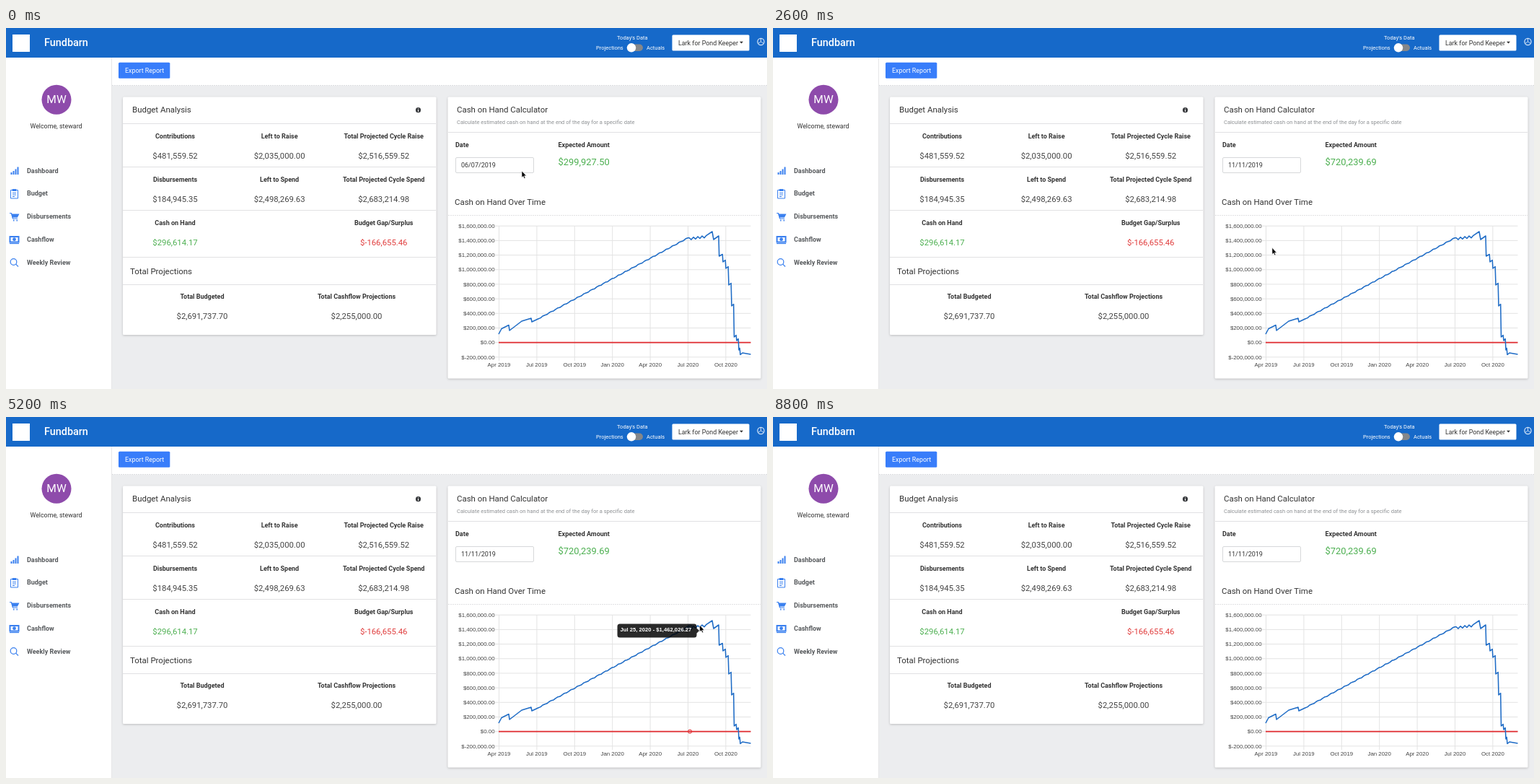
Write an HTML page that moves like this. It is 1055 px wide and 500 px high and loops after 8900 ms.

```html
<!DOCTYPE html>
<html lang="en">
<head>
<meta charset="utf-8">
<title>Campaign dashboard</title>
<style>
  html, body { margin: 0; width: 100%; height: 100%; overflow: hidden; background: #ecedef; }
  svg { display: block; width: 1055px; height: 500px; font-family: Roboto, sans-serif; }
  text { fill: #333; white-space: pre; }
  .mid { text-anchor: middle; }
  .head { font-size: 11.45px; }
  .label { font-size: 9px; font-weight: 700; }
  .value { font-size: 11.3px; fill: #444; }
  .nav { font-size: 9px; font-weight: 700; fill: #56595c; }
  .bar { font-size: 7.5px; }
  .white { fill: #fff; }
  .green { fill: #4caf50; }
  .red { fill: #e03c3c; }
  .rule { stroke: #e1e1e3; }
  .card { fill: #fff; filter: drop-shadow(0 1px 1.5px rgba(0, 0, 0, .2)); }
  .icon { fill: none; stroke: #3a80ef; stroke-width: 1.2; }
  #axes text, #calendar text, #tip text { font-family: "Liberation Sans", Arial, sans-serif; }
  #axes text { font-size: 7.85px; fill: #444; }
  #axes path { stroke: #e3e3e3; }
  #calendar text { font-size: 8.2px; fill: #000; text-anchor: middle; }
  #calendar .title { font-size: 9.75px; font-weight: 700; }
  #calendar .chosen { fill: #fff; }
  #tip text { font-size: 7.67px; font-weight: 700; fill: #fff; }
</style>
</head>
<body>
<svg viewBox="0 0 1055 500">
  <rect width="1055" height="500" fill="#ecedef"/>
  <path d="M0 41H147V500H0ZM147 41H1055V80H147Z" fill="#fff"/>
  <path d="M146.5 41V500" stroke="#e6e6e8"/>
  <path d="M147 79.5H1055" stroke="#dcdde0" stroke-dasharray="2 1"/>

  <!-- top bar -->
  <rect width="1055" height="41" fill="#1669c9"/>
  <rect x="9" y="9" width="24" height="24" fill="#fff"/>
  <text class="white" x="53" y="25" font-size="14.4" font-weight="500">Fundbarn</text>
  <text class="bar white" x="847" y="16">Today's Data</text>
  <text class="bar white" x="818" y="29.5">Projections</text>
  <text class="bar white" x="888" y="29.5">Actuals</text>
  <rect x="862" y="22.5" width="21" height="9.5" rx="4.7" fill="#85878a"/>
  <circle cx="867" cy="27.3" r="6.2" fill="#fff"/>
  <rect x="923.5" y="9.5" width="107" height="22" rx="1.5" fill="#fff"/>
  <text x="932" y="23.5" font-size="8.9">Lark for Pond Keeper</text>
  <path d="M1017 18.8h5l-2.5 2.7Z" fill="#333"/>
  <g fill="none" stroke="#d7e6f8">
    <circle cx="1046.5" cy="19" r="4.6" stroke-width="1.2"/>
    <path d="M1046.5 19v-4.5m0 4.500l-4 2.500m4 -2.500l4 2.500" stroke-width=".9"/>
  </g>

  <!-- sidebar -->
  <circle cx="70" cy="99.3" r="20.5" fill="#8e4bab"/>
  <text class="mid white" x="70" y="104.3" font-size="15.5">MW</text>
  <text class="mid" x="69.5" y="139" font-size="8.85">Welcome, steward</text>
  <g class="icon">
    <path d="M7.5 203v-3m3 3v-5m3 5v-7.500m3 7.500v-10.500" stroke-width="2"/>
    <path d="M6.5 224.500h10v11.500h-10ZM9 223.500h5v2h-5ZM9 228.500h5M9 231h5M9 233.500h3" stroke-width="1"/>
    <path d="M5 256.500h2.500l2 7.500h6.500"/>
    <path d="M8 258h9.500l-2 4h-6.500Z" fill="#3a80ef"/>
    <path d="M10 266.500h1.500m3 0h1.500" stroke-width="2"/>
    <path d="M5.500 289h12v7.500h-12Z" stroke-width="2"/>
    <circle cx="11.5" cy="292.700" r="1.800" fill="#3a80ef"/>
    <path d="M5 298.500h13"/>
    <circle cx="10.5" cy="324" r="4.300"/>
    <path d="M13.700 327.200l3.300 3.300"/>
  </g>

  <rect x="156" y="47.8" width="71.3" height="22" rx="1.5" fill="#387dfa"/>
  <text class="white" x="165" y="62" font-size="8.9">Export Report</text>

  <!-- cards -->
  <rect class="card" x="162" y="95.5" width="434.5" height="329.5" rx="1.5"/>
  <rect class="card" x="612.5" y="95.5" width="434" height="390" rx="1.5"/>
  <path class="rule" d="M162 132.5h434m-434 60h434m-434 60h434m-434 65h434m-434 38h434M613 144.5h433"/>
  <path class="rule" d="M613 259.5h433" stroke-dasharray="2 1"/>
  <circle cx="571.5" cy="113.7" r="3.6" fill="#3b3d40"/>
  <path d="M571.5 113v3m0 -4.700v.9" stroke="#fff"/>
  <text class="head" x="175" y="117">Budget Analysis</text>
  <text class="head" x="172" y="340.5">Total Projections</text>
  <text class="head" x="625" y="117">Cash on Hand Calculator</text>
  <text class="head" x="622" y="245">Cash on Hand Over Time</text>
  <text x="625" y="133" font-size="7.57" style="fill:#8d9093">Calculate estimated cash on hand at the end of the day for a specific date</text>
  <text class="label" x="623" y="164.800">Date</text>
  <text class="label" x="765.5" y="164.800">Expected Amount</text>
  <g id="labels"></g>

  <text id="amount" class="green" x="765.5" y="189.700" font-size="12.9"></text>
  <rect id="field" x="623.5" y="179.5" width="108" height="21" rx="1.5" fill="#fff"/>
  <text id="date" x="631" y="193" font-size="9"></text>
  <path id="caret" d="M679.5 185v10" stroke="#222" stroke-width=".8"/>

  <!-- chart -->
  <g id="axes"></g>
  <path d="M683 435.6H1032.5" stroke="#e02a2f" stroke-width="1.6"/>
  <path id="curve" fill="none" stroke="#1f6cc6" stroke-width="1.55" stroke-linejoin="round"/>
  <g id="dots" stroke-width=".9">
    <circle id="blueDot" r="3.5" fill="#2671c833" stroke="#2671c8"/>
    <circle id="redDot" cy="435.6" r="2.6" fill="#e02a2f33" stroke="#e02a2f"/>
  </g>
  <g id="tip">
    <path d="M3.500 0h103a3.500 3.500 0 0 1 3.500 3.500v12a3.500 3.500 0 0 1 -3.500 3.500h-103a3.500 3.500 0 0 1 -3.500 -3.500v-12a3.500 3.500 0 0 1 3.500 -3.500M110 6l3.500 3.500l-3.500 3.500Z" fill="#000" fill-opacity=".84"/>
    <text x="4" y="10.2"></text>
  </g>
  <g id="calendar"></g>
  <path id="cursor" d="M0 0V9.2L2.1 7.3 3.5 10.5 5 9.8 3.6 6.8H6.4Z" stroke="#fff" stroke-width=".6"/>
</svg>
<script>
const $ = id => document.getElementById(id);
const LOOP = 8900, STEP = 100, DAY = 864e5;
const OPEN = 500, PICK = 2300;

const clamp = (v, lo, hi) => Math.min(hi, Math.max(lo, v));
const show = (id, on) => { $(id).style.display = on ? '' : 'none'; };
const text = (x, y, str, cls = '') => `<text class="${cls}" x="${x}" y="${y}">${str}</text>`;
const money = v => '$' + v.toLocaleString('en-US', { minimumFractionDigits: 2, maximumFractionDigits: 2 });
const dateText = (date, options) => date.toLocaleString('en-US', { timeZone: 'UTC', year: 'numeric', ...options });

// Linear interpolation through rows of [key, value, value, ...]
function track(rows, key) {
  const i = rows.findIndex(r => r[0] >= key);
  if (i < 0) return rows[rows.length - 1].slice(1);
  if (i === 0) return rows[0].slice(1);
  const a = rows[i - 1], b = rows[i], k = (key - a[0]) / (b[0] - a[0]);
  return a.slice(1).map((v, j) => v + (b[j + 1] - v) * k);
}

function drawLabels() {
  const budget = [
    ['Contributions', 481559.52, 'Left to Raise', 2035000, 'Total Projected Cycle Raise', 2516559.52],
    ['Disbursements', 184945.35, 'Left to Spend', 2498269.63, 'Total Projected Cycle Spend', 2683214.98],
    ['Cash on Hand', 296614.17, , , 'Budget Gap/Surplus', -166655.46]
  ];
  const pair = (x, y, label, amount, tone = '') =>
    text(x, y, label, 'label mid') + text(x, y + 28.1, money(amount), 'value mid ' + tone);
  let out = pair(272, 375.2, 'Total Budgeted', 2691737.7) + pair(486, 375.2, 'Total Cashflow Projections', 2255000);
  budget.forEach((row, r) => {
    for (let c = 0; c < 3; c++) {
      const [label, amount] = row.slice(c * 2);
      const tone = r < 2 ? '' : c ? 'red' : 'green';
      if (label) out += pair(234.5 + c * 144.6, 152.7 + r * 59.9, label, amount, tone);
    }
  });
  ['Dashboard', 'Budget', 'Disbursements', 'Cashflow', 'Weekly Review'].forEach((name, i) => {
    out += text(29, 200.5 + i * 31.83, name, 'nav');
  });
  $('labels').innerHTML = out;
}

function drawAxes() {
  let out = '';
  for (let i = 0; i < 10; i++) {
    const y = 274.2 + i * 20.18;
    out += `<path d="M678 ${y}H1032.5"/><text x="677.5" y="${y + 2.7}" text-anchor="end">${money(1.6e6 - i * 2e5)}</text>`;
  }
  for (let i = 0; i < 7; i++) {
    const x = 683.5 + i * 52.4;
    const month = new Date(Date.UTC(2019, 3 + i * 3));
    out += `<path d="M${x} 274V461"/>` + text(x, 469, dateText(month, { month: 'short' }), 'mid');
  }
  $('axes').innerHTML = out;
}

// Balance: an uneven start, a steady climb in small steps, then a fall in stairs
function balance() {
  const start = [[683, 424], [687, 416.5], [697, 411.5], [698, 419], [715, 406], [728, 402], [729, 407]];
  const climb = Array.from({ length: 70 }, (_, i) => [738 + i * 3, 402.7 - i * 1.62 + .6 * Math.sin(i * 2)]);
  const plateau = Array.from({ length: 9 }, (_, i) => [947 + i * 3, 292 - i * .4 + (i % 2 ? 1.5 : -1.5)]);
  const peak = [[979, 282], [981, 293], [988, 288]];
  const drops = [[988.7, 316], [994, 324], [998, 333], [1002, 356], [1006, 385], [1009.5, 428], [1013, 433], [1016, 446], [1018, 452.5]];
  const stairs = drops.flatMap(([x, y], i) => i ? [[x - .8, drops[i - 1][1] - 2.5], [x, y]] : [[x, y]]);
  return [...start, ...climb, ...plateau, ...peak, ...stairs, [1021, 450], [1032.5, 452]];
}
const curve = balance();

function calendarMarkup(month) {
  const first = new Date(Date.UTC(2019, month, 1));
  const lead = first.getUTCDay();
  const length = new Date(Date.UTC(2019, month + 1, 0)).getUTCDate();
  const rows = Math.ceil((lead + length) / 7);
  const col = i => 615.5 + i * 20.65;
  let out = `<rect x="600.5" y="207.5" width="153.5" height="${48.5 + rows * 20.5}" rx="3" fill="#fff" stroke="#b4b4b4"/>
    <rect x="601" y="208" width="152.5" height="39.5" rx="2" fill="#f0f0f0"/>
    <path d="M601 247.5H753.5" stroke="#b4b4b4"/>
    <path d="M628 208L633.5 202.5L639 208" fill="#f0f0f0" stroke="#b4b4b4"/>
    <path d="M616.5 214v8l-4.5 -4ZM738.5 214v8l4.5 -4Z" fill="#c8c8c8"/>`;
  out += text(677.7, 223, dateText(first, { month: 'long' }), 'title');
  ['Su', 'Mo', 'Tu', 'We', 'Th', 'Fr', 'Sa'].forEach((name, i) => { out += text(col(i), 240, name); });
  for (let i = 0; i < rows * 7; i++) {
    const date = new Date(Date.UTC(2019, month, 1 - lead + i));
    const x = col(i % 7), y = 264.8 + Math.floor(i / 7) * 20.5;
    const chosen = date.getUTCMonth() === 5 && date.getUTCDate() === 7;
    if (chosen) out += `<rect x="${x - 9}" y="${y - 12}" width="18" height="18" rx="3" fill="#216ba5"/>`;
    out += text(x, y, date.getUTCDate(), chosen ? 'chosen' : '');
  }
  return out;
}

let shownMonth;
function drawCalendar(t) {
  const open = t >= OPEN && t < PICK;
  show('calendar', open);
  show('caret', open && t % 1000 >= 500);
  $('field').setAttribute('stroke', open ? '#a9abad' : '#d6d8da');
  const month = 5 + clamp(Math.floor((t - 700) / 100), 0, 5);
  if (open && month !== shownMonth) $('calendar').innerHTML = calendarMarkup(shownMonth = month);
  $('date').textContent = t < PICK ? '06/07/2019' : '11/11/2019';
  $('amount').textContent = money(t < PICK + STEP ? 299927.5 : 720239.69);
}

// time, box left, box top, day of 2020, dollars
const hover = [
  [3700, 776, 312, 97, 1166021.87],
  [4500, 823.5, 286, 174, 1413257.36],
  [6000, 875, 287, 242, 1517762.17],
  [6800, 908, 287, 240, 1500005.13]
];

function drawHover(t) {
  const [x, y, day, dollars] = track(hover, t);
  const when = dateText(new Date(Date.UTC(2020, 0, Math.round(day) + 1)  - DAY * 0), { month: 'short', day: '2-digit' });
  const dotX = 882.3 + (day - 97) * .605;
  const opacity = Math.min((t - 3450) / 330, (7250 - t) / 350);
  $('tip').setAttribute('transform', `translate(${x} ${y})`);
  $('tip').setAttribute('opacity', clamp(opacity, 0, 1));
  $('tip').lastElementChild.textContent = `${when} - ${money(dollars)}`;
  show('dots', t >= 3600 && t < 6900);
  $('blueDot').setAttribute('cx', dotX);
  $('blueDot').setAttribute('cy', track(curve, dotX)[0]);
  $('redDot').setAttribute('cx', dotX);
}

const pointer = [
  [0, 715, 198], [500, 700, 192], [800, 739, 217], [1300, 739, 217], [1700, 694, 259],
  [2100, 636, 302], [2300, 636, 302], [3700, 897, 313], [4500, 943, 293], [6000, 983, 283], [6900, 1060, 300]
];

function frame(now) {
  const t = Math.floor(now % LOOP / STEP) * STEP;
  drawCalendar(t);
  drawHover(t);
  $('cursor').setAttribute('transform', `translate(${track(pointer, t).join(' ')})`);
  requestAnimationFrame(frame);
}

$('curve').setAttribute('d', 'M' + curve.join('L'));
drawLabels();
drawAxes();
requestAnimationFrame(frame);
</script>
</body>
</html>
```
